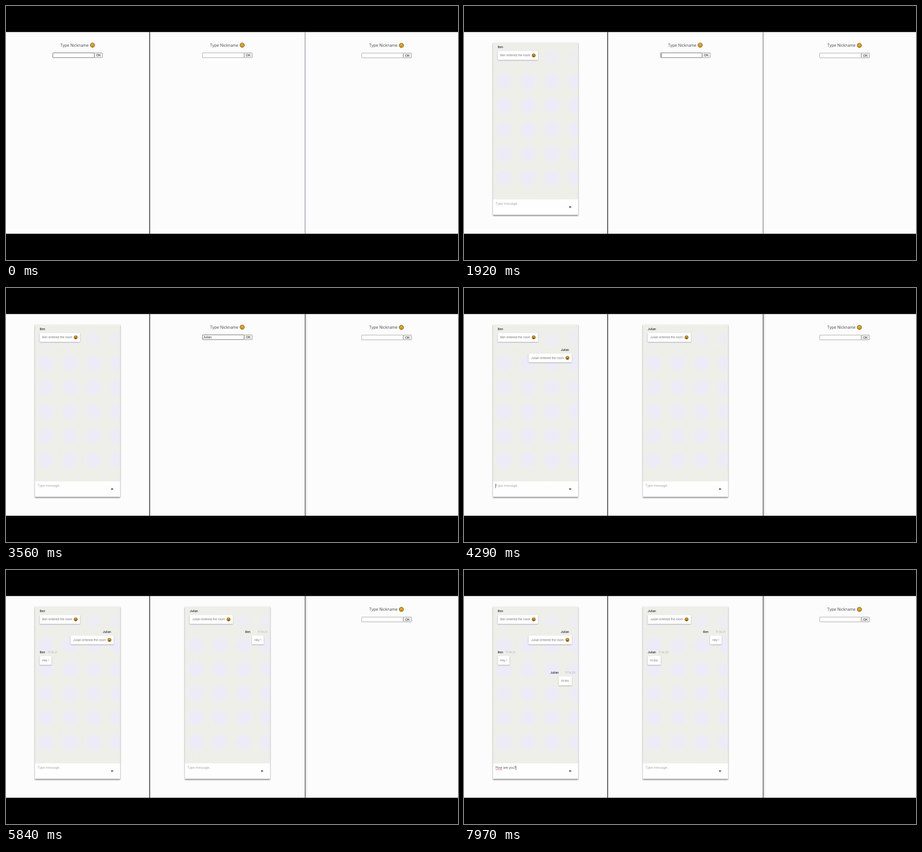
These frames come from a looping animation (998x561 px, 7990 ms). An HTML page:

```html
<!DOCTYPE html>
<html lang="en">
<head>
<meta charset="utf-8">
<title>Chat room</title>
<style>
  html, body { margin: 0; width: 100%; height: 100%; overflow: hidden; background: #000; }
  svg { display: block; width: 100%; height: 100%; }
  text { font-family: Inter, "Open Sans", sans-serif; font-weight: 300; white-space: pre; }
  .title { font-size: 8.65px; fill: #222; }
  .form { font: 7.1px "Liberation Sans", Arial, sans-serif; fill: #222; }
  .name { font-size: 6.5px; font-weight: 500; fill: #1c1c1c; }
  .time { font-size: 6.4px; fill: #9a9a9a; }
  .msg { font-size: 6.6px; fill: #4a4a4a; }
  .short { font-size: 6.2px; }
  .draft { font-size: 7.05px; fill: #222; }
  .hint { fill: #8c8c8c; }
  .card { filter: drop-shadow(0 2px 1.8px rgba(0, 0, 0, .5)); }
  .bubble { fill: #fefefe; filter: drop-shadow(.8px 1px .8px rgba(0, 0, 0, .32)); }
</style>
</head>
<body>
<svg viewBox="0 0 998 561">
  <defs>
    <radialGradient id="glow">
      <stop offset="0" stop-color="#eeedff"/>
      <stop offset=".45" stop-color="#eeedff" stop-opacity=".9"/>
      <stop offset="1" stop-color="#eeedff" stop-opacity="0"/>
    </radialGradient>
    <linearGradient id="edge">
      <stop offset="0" stop-color="#000" stop-opacity=".16"/>
      <stop offset="1" stop-color="#000" stop-opacity="0"/>
    </linearGradient>
    <pattern id="mesh" width="2.67" height="2.67" patternUnits="userSpaceOnUse">
      <path d="M0 .4H2.67M.4 0V2.67" stroke="#dedfd0" stroke-width=".5" opacity=".4"/>
    </pattern>
    <clipPath id="wall"><rect width="188" height="347"/></clipPath>
    <g id="smile">
      <circle r="4.8" fill="#fcb92c" stroke="#493313" stroke-width="1"/>
      <path d="M-2.8 -1Q-1.8 -2.6 -.8 -1M.8 -1Q1.8 -2.6 2.8 -1M-2.6 1.1Q0 4.1 2.6 1.1" fill="none" stroke="#59370c" stroke-width=".9"/>
    </g>
    <g id="laugh">
      <circle r="3.7" fill="#fab62b" stroke="#493313" stroke-width=".9"/>
      <path d="M-2.2 -.8L-.7 -1.4M2.2 -.8L.7 -1.4" stroke="#59370c" stroke-width=".8"/>
      <path d="M-2 .5H2Q1.6 2.9 0 2.9T-2 .5Z" fill="#573014"/>
    </g>
  </defs>
  <rect width="998" height="561"/>
  <rect y="57.5" width="998" height="445.5" fill="#fcfcfd"/>
  <g id="scene"></g>
</svg>
<script>
const LOOP = 7990;
const A = 'Ben', B = 'Julian';
const scene = document.getElementById('scene');

const T = {
  nameA: 840, joinA: 1540, focusB: 1830, nameB: 2500, joinB: 3700,
  focusA: 4180, hey: 4480, sendHey: 5200, reply: 5900, sendReply: 6720, ask: 7000
};

const typed = (text, start, step, t) =>
  text.slice(0, Math.max(0, Math.floor((t - start) / step) + 1));
const blink = (t, from) => t >= from && (t - from) % 1000 < 500;
const rect = (x, y, w, h, attrs) => `<rect x="${x}" y="${y}" width="${w}" height="${h}" ${attrs}/>`;
const text = (x, y, cls, s, attrs = '') => `<text x="${x}" y="${y}" class="${cls}" ${attrs}>${s}</text>`;
const use = (id, x, y) => `<use href="#${id}" x="${x}" y="${y}"/>`;

const ruler = document.createElement('canvas').getContext('2d');
function widthOf(s, font) {
  ruler.font = font;
  return ruler.measureText(s).width;
}
const caret = (x, y, h) => rect(x, y, .8, h, 'fill="#222"');

function login(x, y, value, focused, showCaret) {
  const line = `stroke="${focused ? '#4c4c4c' : '#969696'}" stroke-width=".9" fill="#fff" rx="1"`;
  return text(x + 16.8, y + 3.2, 'title', 'Type Nickname') + use('smile', x + 88, y)
    + rect(x + .4, y + 17, 91.6, 10.5, line)
    + rect(x + 92.4, y + 17, 17.8, 10.5, 'fill="#f2f2f3" stroke="#858585" stroke-width=".9" rx="1"')
    + text(x + 101.3, y + 24.5, 'form', 'OK', 'text-anchor="middle"')
    + text(x + 2, y + 24.4, 'form', value)
    + (showCaret ? caret(x + 2.2 + widthOf(value, '7.1px "Liberation Sans", Arial, sans-serif'), y + 18.2, 8) : '');
}

function message(x, row, { who, body, width, time = '', mine, joined }) {
  const y = 80.5 + row * 45.3;
  const left = mine ? x + 10.5 : x + 174 - width;
  const head = mine
    ? text(x + 10.5, y + 12.8, 'name', who) + text(x + (who === A ? 28 : 34), y + 12.8, 'time', time)
    : text(x + (time ? 145 : 168), y + 12.8, 'name', who, 'text-anchor="end"')
      + text(x + 182, y + 12.8, 'time', time, 'text-anchor="end"');
  return head + rect(left, y + 18.7, width, 19.8, 'class="bubble" rx="1"')
    + text(left + 5.5, y + 30.9, joined ? 'msg' : 'msg short', body)
    + (joined ? use('laugh', left + width - 9.6, y + 28.6) : '');
}

function wall(x) {
  let glows = '';
  for (let r = 0; r < 6; r++)
    for (let c = 0; c < 4; c++)
      glows += `<circle cx="${24.5 + c * 52.7}" cy="${32.5 + r * 53.4}" r="23" fill="url(#glow)" opacity="${r ? 1 : .6}"/>`;
  return `<g transform="translate(${x} 80.5)" clip-path="url(#wall)">`
    + rect(0, 0, 188, 347, 'fill="#f1f1ed"') + glows + rect(0, 0, 188, 347, 'fill="url(#mesh)"') + '</g>';
}

function room(x, messages, draft, showCaret) {
  const font = '300 7.05px Inter, "Open Sans", sans-serif';
  const checked = draft.startsWith('How ');
  return rect(x, 80.5, 188, 380.8, 'fill="#fefefe" class="card"') + wall(x)
    + messages.map((m, i) => message(x, i, m)).join('')
    + text(x + 5.6, 439.4, draft ? 'draft' : 'draft hint', draft || 'Type message..')
    + (checked ? rect(x + 5.6, 440.6, widthOf('How', font), .8, 'fill="#d0484e"') : '')
    + (showCaret ? caret(x + 5.4 + widthOf(draft, font), 432.6, 9.4) : '')
    + `<path d="M${x + 168.6} 441.4l5 2.6l-5 2.6z" fill="#555"/>`;
}

function dividers(t) {
  const late = t >= T.nameB;
  return rect(316.4, 57.5, 1.7, 445.5, 'fill="#302e29"')
    + (late ? rect(661, 57.5, 5, 445.5, 'fill="url(#edge)"') : '')
    + rect(659.8, 57.5, 1.3, 445.5, `fill="${late ? '#424242' : t < T.joinA ? '#85828f' : '#707070'}"`);
}

const joined = (who, width, mine) =>
  ({ who, width, mine, joined: true, body: `${who} entered the room` });

function chatA(t) {
  const list = [joined(A, 89, true)];
  if (t >= T.joinB) list.push(joined(B, 95.5, false));
  if (t >= T.sendHey) list.push({ who: A, body: 'Hey !', width: 26, time: '11:14:21', mine: true });
  if (t >= T.sendReply) list.push({ who: B, body: 'Hi bro', width: 29, time: '11:14:25' });
  const draft = t < T.sendHey ? typed('Hey !', T.hey, 120, t) : typed('How are you?', T.ask, 80, t);
  const active = (t >= T.focusA && t < T.sendHey) || t >= T.ask - 120;
  return room(64, list, draft, active && (draft || blink(t, T.focusA)));
}

function chatB(t) {
  const list = [joined(B, 95.5, true)];
  if (t >= T.sendHey) list.push({ who: A, body: 'Hey !', width: 26, time: '11:14:21' });
  if (t >= T.sendReply) list.push({ who: B, body: 'Hi bro', width: 29, time: '11:14:25', mine: true });
  const draft = t < T.sendReply ? typed('Hi bro', T.reply, 110, t) : '';
  return room(395, list, draft, draft);
}

function draw(t) {
  const nick = typed(B, T.nameB, 120, t);
  return dividers(t)
    + (t < T.joinA ? login(103, 86.5, typed(A, T.nameA, 120, t), true, false) : chatA(t))
    + (t < T.joinB
      ? login(433.5, 86.5, nick, t >= T.focusB, t < T.joinB - 150 && (nick || blink(t, T.focusB)))
      : chatB(t))
    + login(785, 87, '', false, false);
}

let last = '';
function tick() {
  const markup = draw(performance.now() % LOOP);
  if (markup !== last) scene.innerHTML = last = markup;
  requestAnimationFrame(tick);
}
tick();
</script>
</body>
</html>
```
